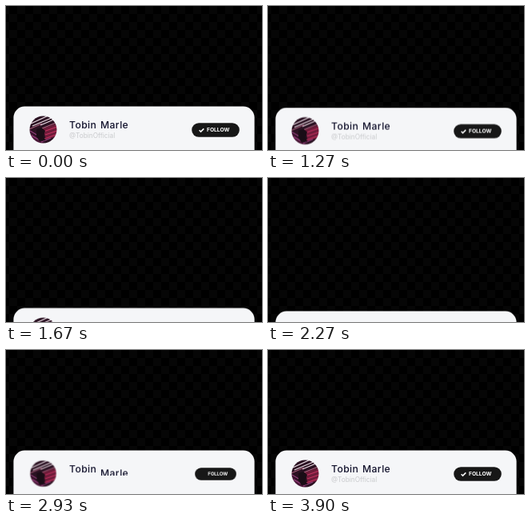
An HTML page for the animation above (4.83 s loop, 320 px wide and 180 px high).

```html
<!DOCTYPE html>
<html lang="en">
<head>
<meta charset="utf-8">
<title>Profile card</title>
<style>
  html, body { margin: 0; width: 100%; height: 100%; overflow: hidden; background: #000; }
  svg { display: block; width: 100%; height: 100%; }
  text { font-family: Inter, Roboto, sans-serif; }

  .card, .avatar, .button, .word, .check {
    animation: 4830ms linear infinite both;
  }
  .card { animation-name: slide; }
  .avatar { animation-name: grow-avatar; transform-origin: 46.5px 154.5px; }
  .button { animation-name: grow-button; transform-origin: 262px 155px; }
  .word { animation-name: rise; }
  .second { animation-delay: 220ms; }
  .third { animation-delay: 440ms; }
  .check { animation-name: draw; stroke-dasharray: 1 2; }

  .name { font-size: 12.2px; font-weight: 500; letter-spacing: .4px; fill: #12122c; }
  .handle { font-size: 8.3px; fill: #c9cacd; }
  .follow { font-size: 6.7px; font-weight: 700; fill: #fff; }

  @keyframes slide {
    0%, 19.25% { transform: translateY(0); }
    22.8% { transform: translateY(.4px); }
    26.3% { transform: translateY(1.5px); }
    27.95% { transform: translateY(2.6px); }
    29.6% { transform: translateY(4.7px); }
    31.06% { transform: translateY(9px); }
    32.5% { transform: translateY(18px); }
    33.54% { transform: translateY(28px); }
    34.58% { transform: translateY(37px); }
    35.6% { transform: translateY(44px); }
    37.27% { transform: translateY(50.5px); }
    39.96%, 40.8% { transform: translateY(56px); }
    41.4% { transform: translateY(54px); }
    44.5% { transform: translateY(50px); }
    45.76% { transform: translateY(46.3px); }
    47% { transform: translateY(41px); }
    48.2% { transform: translateY(29px); }
    49.5% { transform: translateY(15px); }
    50.5% { transform: translateY(7.5px); }
    51.8% { transform: translateY(2.7px); }
    53.8% { transform: translateY(.7px); }
    57.1%, 100% { transform: translateY(0); }
  }
  @keyframes grow-avatar {
    0%, 40.8% { transform: scale(1); }
    40.81%, 48.2% { transform: scale(0); animation-timing-function: cubic-bezier(.2, .8, .3, 1); }
    69%, 100% { transform: scale(1); }
  }
  @keyframes grow-button {
    0%, 40.8% { transform: scale(1); }
    40.81%, 54.2% { transform: scale(0); animation-timing-function: cubic-bezier(.2, .8, .2, 1); }
    72.7%, 100% { transform: scale(1); }
  }
  @keyframes rise {
    0%, 35.2% { transform: translateY(0); }
    35.21%, 51.3% { transform: translateY(14px); animation-timing-function: cubic-bezier(.6, 0, .2, 1); }
    61.7%, 100% { transform: translateY(0); }
  }
  @keyframes draw {
    0%, 40.8% { stroke-dashoffset: 0; stroke-opacity: 1; }
    40.81%, 73.8% { stroke-dashoffset: 1; stroke-opacity: 0; }
    73.81% { stroke-dashoffset: 1; stroke-opacity: 1; animation-timing-function: ease-out; }
    78%, 100% { stroke-dashoffset: 0; stroke-opacity: 1; }
  }
</style>
</head>
<body>
<svg viewBox="0 0 320 180">
  <defs>
    <pattern id="checker" x="4" width="20" height="20" patternUnits="userSpaceOnUse">
      <path d="M10 0h10v10H0v10h10z" fill="#060606"/>
    </pattern>
    <clipPath id="round"><circle cx="46.5" cy="154.5" r="17"/></clipPath>
    <clipPath id="name-line"><rect x="70" y="138" width="120" height="19"/></clipPath>
    <clipPath id="handle-line"><rect x="70" y="155" width="120" height="12"/></clipPath>
  </defs>

  <rect width="320" height="180" fill="#000"/>
  <rect width="320" height="180" fill="url(#checker)"/>

  <g class="card">
    <rect x="9.4" y="125.6" width="301.2" height="140" rx="14" fill="#f5f6f8"/>

    <g class="avatar">
      <g clip-path="url(#round)" fill="none">
        <rect x="29" y="137" width="35" height="35" fill="#2b1222"/>
        <path d="M29 157l20 15H29z" fill="#4a1838"/>
        <path d="M46 153l18-6v16l-14 4z" fill="#6f1c3a"/>
        <path d="M31 147l22-10M33 150l26-11M43 149l19-8" stroke="#e6d8e0" stroke-width="1.3"/>
        <path d="M29 154l16-7M45 153l20-8" stroke="#a8607c" stroke-width="1.1"/>
        <path d="M47 157l17-6M49 161l15-5M48 166l14-5" stroke="#c43260" stroke-width="1.1"/>
        <path d="M30 156l10 6M32 162l9 5M44 170l12-5" stroke="#95407e" stroke-width="1.1"/>
        <path d="M38 154l6-2 5 4-2 6 2 6-7 1-4-6z" fill="#1a0d16"/>
      </g>
    </g>

    <g clip-path="url(#name-line)" class="name">
      <text class="word" x="79" y="153.2">Tobin</text>
      <text class="word second" x="118" y="153.2">Marle</text>
    </g>
    <g clip-path="url(#handle-line)" class="handle">
      <text class="word third" x="79" y="165">@TobinOfficial</text>
    </g>

    <g class="button">
      <rect x="232.2" y="146.2" width="59.6" height="17.6" rx="8.8" fill="#171717"/>
      <text class="follow" x="251" y="157.4">FOLLOW</text>
      <path class="check" d="M241.6 155.2l1.9 1.9 3.8-3.7" pathLength="1" fill="none" stroke="#fff" stroke-width="1.5"/>
    </g>
  </g>
</svg>
</body>
</html>
```
